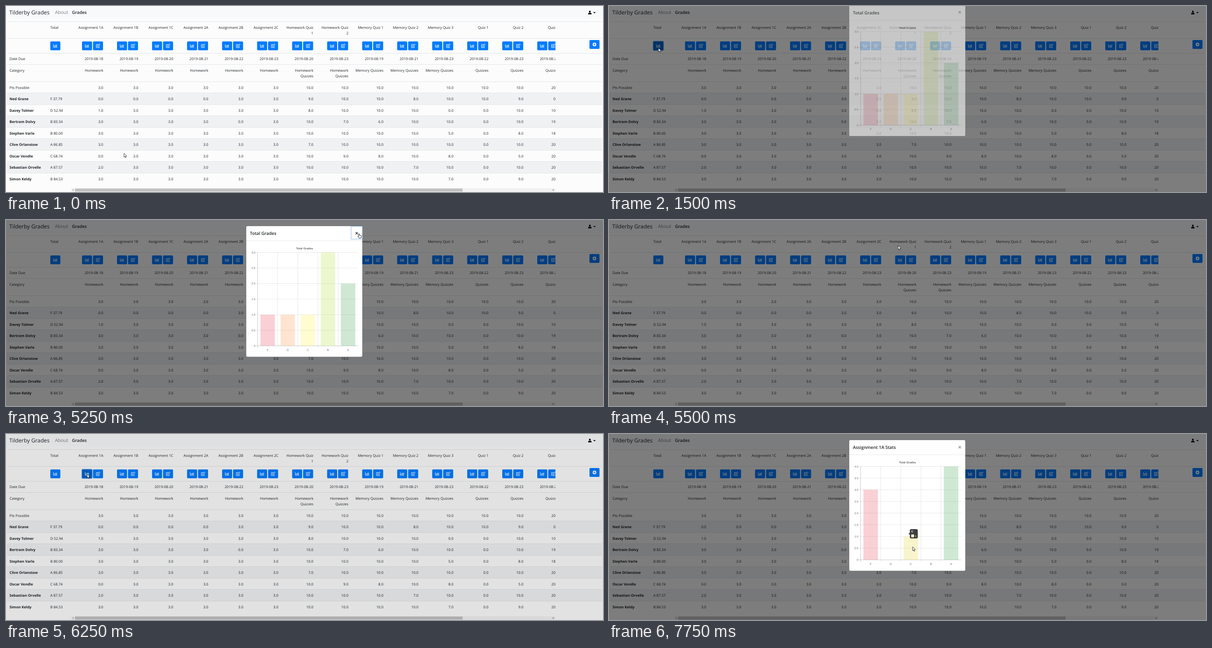
An HTML page for the animation above (8 s loop, 1280 by 399 pixels).

```html
<!DOCTYPE html>
<html lang="en">
<head>
<meta charset="utf-8">
<title>Grade book</title>
<style>
  html, body { margin: 0; width: 100%; height: 100%; overflow: hidden; background: #fcfcfc; }
  svg { display: block; width: 100%; height: 100%; }
  text { font: 7.7px "Open Sans", "Noto Sans", sans-serif; fill: #212529; text-rendering: geometricPrecision; white-space: pre; }
  .end { text-anchor: end; }
  .mid { text-anchor: middle; }
  .bold { font-weight: 700; }
  .brand { font-size: 11.8px; font-weight: 500; }
  .nav { font-size: 10px; fill: #7d7e80; }
  .here { font-size: 9.3px; font-weight: 600; }
  .title { font-size: 9.4px; font-weight: 600; }
  .close { font-size: 13px; font-weight: 700; }
  .axis, .tip { font: 6px "Liberation Sans", Arial, sans-serif; fill: #666; }
  .tip { fill: #fff; }
  .strong { font-weight: 700; }
  .icon { fill: none; stroke: #fff; stroke-width: 1; }
</style>
</head>
<body>
<svg viewBox="0 0 1280 399" preserveAspectRatio="none">
  <defs><clipPath id="pane"><rect x="140" width="1038" height="399"/></clipPath></defs>
  <g id="page"></g>
  <g id="overlay"></g>
</svg>
<script>
const LOOP = 8000, STEP = 250;
const BLUE = '#007bff';

const rect = (x, y, w, h, fill, extra = '') =>
  `<rect x="${x}" y="${y}" width="${w}" height="${h}" fill="${fill}" ${extra}/>`;
const text = (x, y, s, cls = '', extra = '') =>
  `<text x="${x}" y="${y}" class="${cls}" ${extra}>${s}</text>`;
const path = (d, extra) => `<path d="${d}" ${extra}/>`;
const at = (x, y, body, extra = '') => `<g transform="translate(${x} ${y})" ${extra}>${body}</g>`;
const clamp = v => Math.max(0, Math.min(1, v));

// ---- Grade table ----
const columns = [
  ...['1A', '1B', '1C', '2A', '2B', '2C'].map((n, i) => [['Assignment ' + n], 18 + i, ['Homework'], 3]),
  [['Homework Quiz', '1'], 20, ['Homework', 'Quizzes'], 10],
  [['Homework Quiz', '2'], 23, ['Homework', 'Quizzes'], 10],
  ...[19, 21, 23].map((day, i) => [['Memory Quiz ' + (i + 1)], day, ['Memory Quizzes'], 10]),
  [['Quiz 1'], 22, ['Quizzes'], 10],
  [['Quiz 2'], 23, ['Quizzes'], 10],
  [['Quiz 3'], 24, ['Quizzes'], 20],
];

// Each student lists only the scores below full marks, by column.
const rows = [
  ['Pts Possible', '', {}],
  ['Ned Grane', 'F 37.79', {0: 0, 1: 0, 2: 0, 3: 0, 6: 9, 9: 8, 12: 9, 13: 0}],
  ['Davey Tolmer', 'D 52.94', {0: 1, 6: 8, 10: 0, 11: 0, 13: 10}],
  ['Bertram Dolvy', 'B 83.34', {4: 0, 7: 7, 8: 6, 11: 0, 13: 19}],
  ['Stephen Varle', 'B 80.00', {10: 5, 11: 0, 12: 8, 13: 18}],
  ['Clive Orlanstow', 'A 86.85', {6: 7, 11: 0}],
  ['Oscar Vendle', 'C 68.74', {0: 0, 7: 9, 8: 8, 10: 8, 11: 0, 12: 5}],
  ['Sebastian Orvelle', 'A 87.57', {0: 2, 9: 7, 11: 0}],
  ['Simon Keldy', 'B 84.53', {10: 7, 11: 0, 12: 9}],
];
const rowTop = i => 162.3 + 24.5 * i;

const chartIcon = path('M-3.9 -3.4V2.9H4.1', 'class="icon"') +
  path('M-1.8 1.6V-.4M0 1.6V-2.4M1.6 1.6V-1.2M3.2 1.6V-2.8', 'class="icon"');
const editIcon = path('M.6 -2.8H-3.7V3.6H2.7V.8', 'class="icon"') +
  path('M-1.4 1.5L-1.1 -.4L3 -4.2L4.4 -2.8L.4 1.2Z', 'class="icon" stroke-width=".8"');
const plusIcon = '<circle r="3.9" fill="#fff"/>' + path('M-2.2 0H2.2M0 -2.2V2.2', `stroke="${BLUE}" stroke-width="1.2"`);

const button = (x, icon, y = 76, fill = BLUE, extra = '') =>
  rect(x, y, 21.5, 19, fill, `rx="2" ${extra}`) + at(x + 10.75, y + 9.5, icon);
const pressed = x =>
  rect(x - 1.2, 74.8, 23.9, 21.4, '#80bdff', 'rx="3"') + button(x, chartIcon, 76, '#0062cc');

function drawColumn([names, day, category, points], i) {
  const right = 208.5 + 75.08 * i;
  const lines = (list, y) => list.map((s, k) => text(right, y + 12 * k, s, 'end')).join('');
  const scores = rows.map(([, , lost], r) =>
    text(right, rowTop(r) + 15.3, (lost[i] ?? points).toFixed(1), 'end')).join('');
  return lines(names, 48.5) + button(right - 45.5, chartIcon) + button(right - 22, editIcon) +
    text(right, 116.4, '2019-08-' + day, 'end') + lines(category, 141.2) + scores;
}

function drawPage() {
  let out = rect(0, 0, 1280, 399, '#fcfcfc') + rect(0, 0, 1280, 27, '#f8f9fb');
  out += text(7, 17.6, 'Tilderby Grades', 'brand') + text(105, 17, 'About', 'nav') + text(141.5, 16.8, 'Grades', 'here');
  out += '<circle cx="1251.8" cy="12" r="1.9"/>' +
    path('M1248.3 18V16.4Q1248.3 14.4 1250.3 14.4H1253.3Q1255.3 14.4 1255.3 16.4V18Z', '') +
    path('M1259 13H1264.4L1261.7 15.8Z', '');
  for (let i = 1; i < rows.length; i += 2) out += rect(2, rowTop(i), 1276, 24.5, '#f0f1f3');
  for (const y of [33, 69, 101, 125, ...rows.map((_, i) => Math.floor(rowTop(i)))])
    out += rect(2, y, 1276, 1, '#e3e6e9');
  out += text(95, 48.5, 'Total') + button(95, chartIcon) + button(1251, plusIcon, 73);
  out += text(7.5, 116.4, 'Date Due') + text(7.5, 141.2, 'Category');
  rows.forEach(([name, total], i) => {
    out += text(7.5, rowTop(i) + 15.3, name, i ? 'bold' : '') + text(95, rowTop(i) + 15.3, total);
  });
  out += `<g clip-path="url(#pane)">${columns.map(drawColumn).join('')}</g>`;
  out += rect(140, 391, 1038, 7.5, '#f1f1f1') + rect(148, 391.5, 831, 6.5, '#c1c1c1');
  return out + path('M144.5 393V396.4L142.6 394.7Z', 'fill="#777"') + path('M1172.6 393V396.4L1174.5 394.7Z', 'fill="#444"');
}

// ---- Modal with bar chart ----
const letters = 'FDCBA';
const barColors = ['225,20,45', '253,126,20', '255,240,15', '160,215,15', '15,140,40'];
const hoverColors = ['200,10,35', '225,105,5', '220,200,0', '135,185,5', '5,110,25'];

const modals = [
  {title: 'Total Grades', top: 3, values: [1, 1, 1, 3, 2], opens: 1265, closes: 5290},
  {title: 'Assignment 1A Stats', top: 4, values: [3, 0, 1, 0, 4], opens: 6220, closes: Infinity},
];

// Time, letter, body corner, side of the caret; an empty letter hides the tooltip.
const tooltips = [
  [0, ''], [2500, 'D', 574, 193.3, 'left'], [2750, 'D', 607.5, 193.3, 'left'], [3000, 'C', 614, 193.3, 'left'],
  [3250, 'C', 650.5, 193.3, 'left'], [3750, 'B', 681.3, 74, 'top'], [4250, 'A', 712.3, 126.4, 'right'], [4750, ''],
  [7500, 'F', 564.5, 109.6, 'left'], [7750, 'C', 645, 204, 'left'],
];
const carets = {left: 'M0 7.5L-2.5 10L0 12.5Z', right: 'M17 7.5L19.5 10L17 12.5Z', top: 'M6 0L8.5 -2.5L11 0Z'};

function drawTooltip([, letter, x, y, side], values) {
  const i = letters.indexOf(letter);
  return at(x, y, rect(0, 0, 17, 20, '#000', 'rx="3"') + path(carets[side], ''), 'opacity=".75"') +
    at(x, y, text(3, 7.3, letter, 'tip strong') + rect(3, 11.5, 6, 6, '#fff') +
      rect(3.5, 12, 5, 5, `rgba(${hoverColors[i]},.2)`) + text(11, 16.7, values[i], 'tip'));
}

function drawModal({title, top, values}, t) {
  const left = 539.5, base = 270, slot = 43.1;
  const yOf = v => base - 200.5 * v / top;
  const tip = tooltips.findLast(k => k[0] <= t);
  const onClose = t >= 5000 && t < 5500;
  let out = rect(515, 13, 249, 280.5, '#fff', 'rx="2.4" stroke="#000" stroke-opacity=".2" stroke-width=".5"');
  out += text(523, 32.4, title, 'title') + rect(515, 44, 249, 1, '#e6e9ec');
  if (t === 5250) out += rect(740, 13.5, 24, 27.5, 'none', 'stroke="#8db9ee"');
  out += text(752, 32.8, '×', 'close mid', `opacity="${onClose ? .9 : .5}"`);
  out += text(640, 63, 'Total Grades', 'axis strong mid');
  for (let v = 0; v <= top; v += .5) {
    out += rect(536, yOf(v) - .5, 219, 1, '#000', `opacity="${v ? .09 : .2}"`);
    out += text(534.5, yOf(v) + 2.1, v ? v.toFixed(1) : '0', 'axis end');
  }
  values.forEach((v, i) => {
    const x = left + slot * i, color = tip[1] === letters[i] ? hoverColors[i] : barColors[i];
    out += rect(x - .5, 69.5, 1, 204.5, '#000', `opacity="${i ? .09 : .2}"`);
    out += rect(x + 6, yOf(v), 31, base - yOf(v), `rgba(${color},.2)`);
    out += text(x + slot / 2, 280.6, letters[i], 'axis mid');
  });
  return out + (tip[1] ? drawTooltip(tip, values) : '');
}

// ---- Pointer ----
const pointerPath = [
  [0, 253, 316], [250, 244, 302], [500, 220, 250], [750, 170, 165], [1000, 122, 108], [1250, 106, 90], [1500, 106, 90],
  [1750, 120, 95], [2250, 470, 210], [2500, 592, 240], [2750, 610, 241], [3000, 638, 241], [3500, 672, 242],
  [3750, 689, 242], [4000, 692, 236], [4500, 738, 150], [5000, 756, 36], [5250, 756, 29], [5500, 620, 55],
  [5750, 206, 109], [6000, 182, 96], [6250, 174, 86], [6750, 174, 86], [7250, 440, 195], [7500, 566, 240], [7750, 651, 242],
];
const arrow = path('M0 0V8.3L1.9 6.6L3.2 9.6L4.5 9L3.2 6.1H5.8Z', 'fill="#fff" stroke="#000" stroke-width=".7"');
const hand = path('M0 .8Q.8 -.6 1.6 .8V3.6L5 4.3Q6 4.6 6 5.8Q6 8 5 9.8H.8L-1.8 6.2Q-1.6 4.8 0 6Z',
  'fill="#fff" stroke="#000" stroke-width=".8"');

function drawPointer(t) {
  const i = pointerPath.findLastIndex(k => k[0] <= t);
  const a = pointerPath[i], b = pointerPath[i + 1] || a;
  const p = (t - a[0]) / (b[0] - a[0] || 1);
  return at(a[1] + (b[1] - a[1]) * p, a[2] + (b[2] - a[2]) * p, t === 5000 || t === 5250 ? hand : arrow);
}

// ---- Playback ----
function drawOverlay(t) {
  let out = '';
  if (t === 1250 || t === 1500) out += pressed(95);
  if (t === 6250 || t === 6500) out += pressed(163);
  for (const modal of modals) {
    const {opens, closes} = modal;
    if (t < opens || t > closes + 300) continue;
    out += rect(0, 0, 1280, 399, '#000', `opacity="${.5 * clamp((t - opens) / 150)}"`);
    const age = t - opens - 150;
    const opacity = Math.min(clamp(age / 150), clamp(1 - (t - closes) / 150));
    const lift = -25 * (1 - clamp(age / 300)) ** 1.65;
    if (opacity) out += at(0, lift, drawModal(modal, t), `opacity="${opacity}"`);
  }
  return out + drawPointer(t);
}

const overlay = document.getElementById('overlay');
document.getElementById('page').innerHTML = drawPage();
let shown = -1;
const start = performance.now();
function tick() {
  const t = Math.floor((performance.now() - start) % LOOP / STEP) * STEP;
  if (t !== shown) overlay.innerHTML = drawOverlay(shown = t);
  requestAnimationFrame(tick);
}
tick();
</script>
</body>
</html>
```
